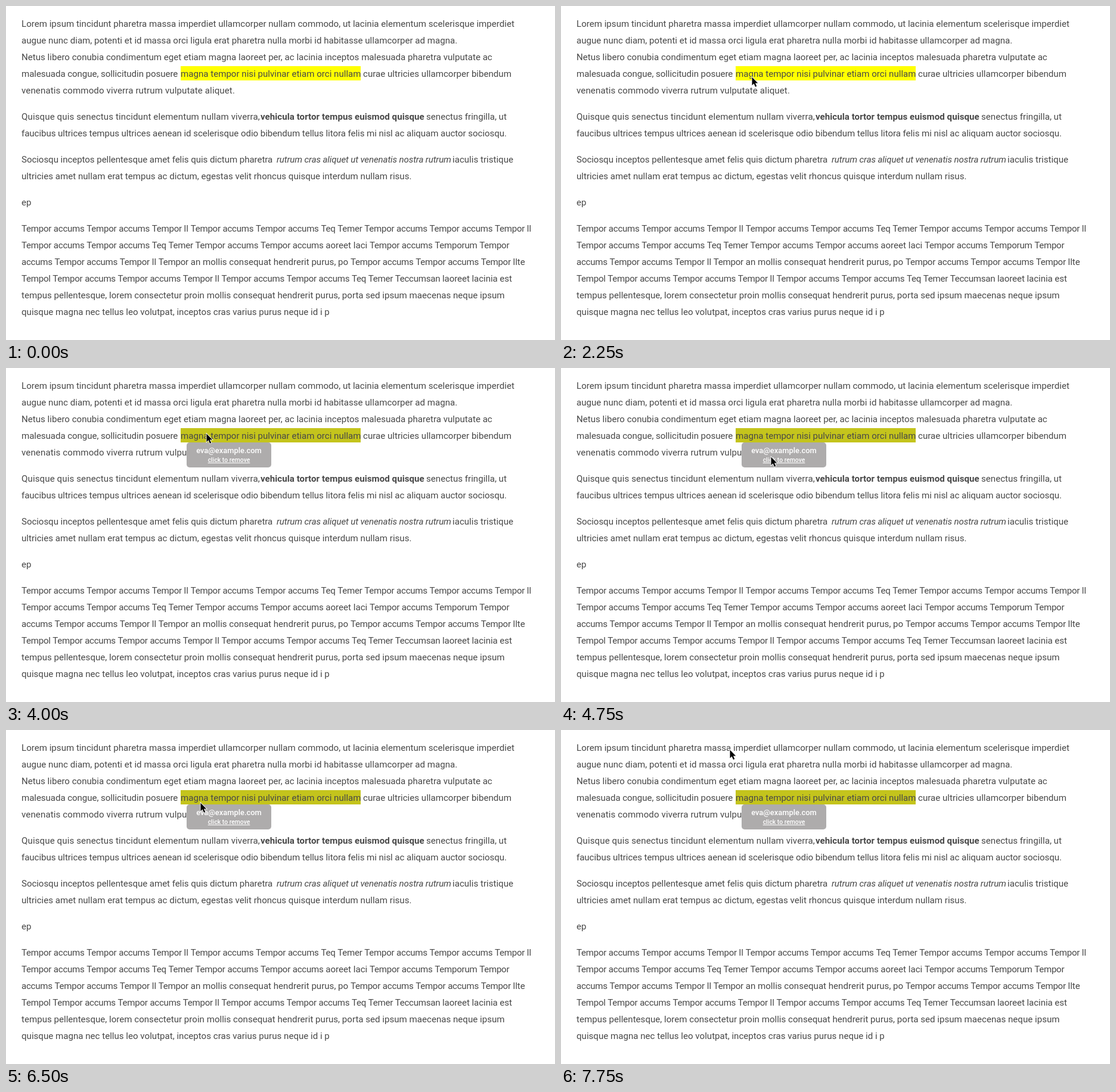
Recreate the animation shown at these times as an HTML page. Size 921 px wide and 561 px high, loop 8 s.

```html
<!DOCTYPE html>
<html lang="la">
<head>
<meta charset="utf-8">
<title>Highlighted text</title>
<style>
html, body { margin: 0; width: 100%; height: 100%; overflow: hidden; background: #fff; }
svg { display: block; font-family: Roboto, "Open Sans", sans-serif; font-size: 15.1px; }
#copy { fill: #484848; }
.bold { font-weight: 700; letter-spacing: .04px; }
.italic { font-style: italic; letter-spacing: -.12px; }
.tight { letter-spacing: -.27px; }
.snug { letter-spacing: -.07px; }
.loose { letter-spacing: .1px; }
.mail { font-size: 12.9px; font-weight: 500; }
.link { font-size: 10.4px; font-weight: 500; text-decoration: underline; }
.tip { fill: #fff; text-anchor: middle; }
.mark { fill: #ff0; animation: mark 8s step-end infinite; }
.tip { animation: tip 8s step-end infinite; }
.cursor { animation: move 8s step-end infinite; }
@keyframes mark { 0% { fill: #ff0 } 50%, 100% { fill: #c4c41c } }
@keyframes tip { 0% { opacity: 0 } 50%, 100% { opacity: 1 } }
@keyframes move {
  0% { transform: translate(-40px, 0) }
  6.25% { transform: translate(624px, 84px) }
  9.375% { transform: translate(530px, 99px) }
  12.5% { transform: translate(425px, 111px) }
  15.625% { transform: translate(359px, 115px) }
  18.75% { transform: translate(354px, 117px) }
  21.875% { transform: translate(340px, 121px) }
  25% { transform: translate(326px, 122px) }
  28.125% { transform: translate(320px, 119px) }
  31.25% { transform: translate(323px, 114px) }
  34.375% { transform: translate(329px, 112px) }
  43.75% { transform: translate(336px, 110px) }
  56.25% { transform: translate(340px, 128px) }
  59.375% { transform: translate(352px, 149px) }
  62.5% { transform: translate(360px, 159px) }
  68.75% { transform: translate(383px, 162px) }
  71.875% { transform: translate(393px, 188px) }
  75% { transform: translate(374px, 140px) }
  78.125% { transform: translate(345px, 76px) }
  81.25% { transform: translate(326px, 122px) }
  84.375% { transform: translate(318px, 105px) }
  87.5% { transform: translate(306px, 80px) }
  90.625% { transform: translate(294px, 58px) }
  93.75% { transform: translate(286px, 42px) }
  96.875%, 100% { transform: translate(283px, 33px) }
}
</style>
</head>
<body>
<svg width="921" height="561" viewBox="0 0 921 561">
  <rect class="mark" x="293" y="101" width="302" height="24"/>
  <g id="copy"></g>
  <g class="tip">
    <rect x="303" y="125" width="142" height="42" rx="5" fill="#aeacac"/>
    <text class="mail" x="374" y="143">eva@example.com</text>
    <text class="link" x="374" y="158">click to remove</text>
  </g>
  <path class="cursor" d="M.5 .5V14.2L3.6 11.3 6 16.7 8.3 15.7 5.9 10.4H10.2Z" fill="#000" stroke="#fff" stroke-width="1.6" paint-order="stroke"/>
</svg>
<script>
// A line is a string, or a list of runs: [x, text, class]
const paragraphs = [
  [35, [
    'Lorem ipsum tincidunt pharetra massa imperdiet ullamcorper nullam commodo, ut lacinia elementum scelerisque imperdiet',
    'augue nunc diam, potenti et id massa orci ligula erat pharetra nulla morbi id habitasse ullamcorper ad magna.',
    'Netus libero conubia condimentum eget etiam magna laoreet per, ac lacinia inceptos malesuada pharetra vulputate ac',
    [[26, 'malesuada congue, sollicitudin posuere', 'snug'],
     [293, 'magna tempor nisi pulvinar etiam orci nullam'],
     [599, 'curae ultricies ullamcorper bibendum']],
    [[26, 'venenatis commodo viverra rutrum vulputate aliquet.', 'loose']]
  ]],
  [191, [
    [[26, 'Quisque quis senectus tincidunt elementum nullam viverra,', 'loose'],
     [427, 'vehicula tortor tempus euismod quisque', 'bold'],
     [705, 'senectus fringilla, ut']],
    [[26, 'faucibus ultrices tempus ultrices aenean id scelerisque odio bibendum tellus litora felis mi nisl ac aliquam auctor sociosqu.', 'snug']]
  ]],
  [263, [
    [[26, 'Sociosqu inceptos pellentesque amet felis quis dictum pharetra', 'snug'],
     [454, 'rutrum cras aliquet ut venenatis nostra rutrum', 'italic'],
     [749, 'iaculis tristique']],
    'ultricies amet nullam erat tempus ac dictum, egestas velit rhoncus quisque interdum nullam risus.'
  ]],
  [335, ['ep']],
  [379, [
    'Tempor accums Tempor accums Tempor ll Tempor accums Tempor accums Teq Temer Tempor accums Tempor accums Tempor ll',
    'Tempor accums Tempor accums Teq Temer Tempor accums Tempor accums aoreet laci Tempor accums Temporum Tempor',
    'accums Tempor accums Tempor ll Tempor an mollis consequat hendrerit purus, po Tempor accums Tempor accums Tempor llte',
    [[26, 'Tempol Tempor accums Tempor accums Tempor ll Tempor accums Tempor accums Teq Temer Teccumsan laoreet lacinia est', 'snug']],
    'tempus pellentesque, lorem consectetur proin mollis consequat hendrerit purus, porta sed ipsum maecenas neque ipsum',
    'quisque magna nec tellus leo volutpat, inceptos cras varius purus neque id i p'
  ]]
];

const tighten = s => s.replace(/\b(T\w+|accums)\b/g, '<tspan class="tight">$1</tspan>');
const run = y => ([x, text, style = '']) =>
  `<text x="${x}" y="${y}" class="${style}">${tighten(text)}</text>`;

document.getElementById('copy').innerHTML = paragraphs.map(([top, lines]) =>
  lines.map((line, i) => {
    const runs = Array.isArray(line) ? line : [[26, line]];
    return runs.map(run(top + i * 28)).join('');
  }).join('')
).join('');
</script>
</body>
</html>
```
